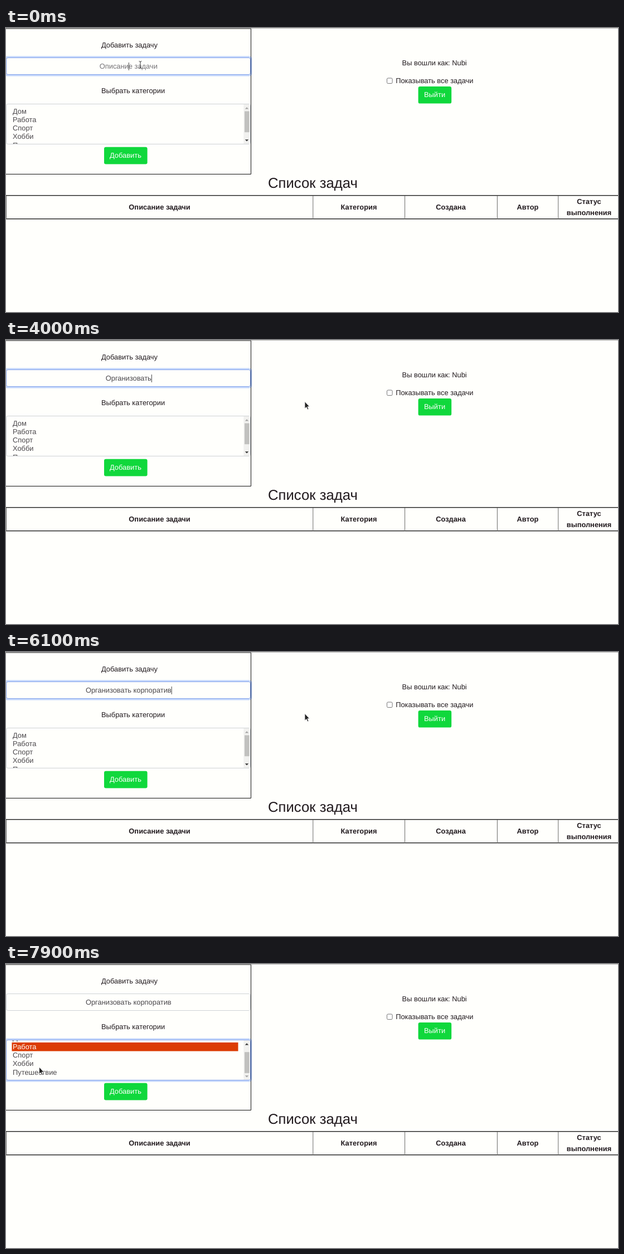
Write an HTML page that moves like this. It is 1098x510 px and loops after 8 s.

```html
<!DOCTYPE html>
<html lang="ru">
<head>
<meta charset="utf-8">
<title>Список задач</title>
<style>
  html, body { margin: 0; width: 100%; height: 100%; overflow: hidden; background: #fffffc; }
  svg { display: block; width: 1098px; height: 510px; }
  text {
    font: 12.86px "Liberation Sans", Arial, sans-serif;
    fill: #211a1e; white-space: pre; text-rendering: geometricPrecision;
  }
  .title { font-size: 25.72px; }
  .head text { font-weight: bold; text-anchor: middle; }
  .btn rect { fill: #10d83c; }
  .btn text { fill: #fff; }
  .field { fill: #fffffc; stroke: #ced2d6; }
  .focus rect { fill: none; stroke: #86a4ea; }
  .focus .ring { stroke: rgb(13, 90, 245); stroke-opacity: .25; stroke-width: 2.6; }
  .options text { fill: #4b484c; }
  .options .chosen { fill: #fff; }
  #hint { fill: #747276; }
  #typed { fill: #4b484c; }
  #hint, #typed { text-anchor: middle; }
</style>
</head>
<body>
<svg viewBox="0 0 1098 510">
  <defs>
    <clipPath id="listClip"><rect x="1" y="137" width="425" height="71"/></clipPath>
  </defs>

  <path d="M440 .5H1098" stroke="#b8b8b6"/>
  <path d="M0 1H439.5V262.5H0" fill="none" stroke="#111"/>

  <text x="171" y="35">Добавить задачу</text>
  <text x="171" y="117">Выбрать категории</text>

  <rect class="field" x=".5" y="53.5" width="438" height="30" rx="3"/>
  <g class="focus" id="inputFocus">
    <rect class="ring" x="-1.3" y="51.7" width="441.6" height="33.6" rx="4.3"/>
    <rect x=".5" y="53.5" width="438" height="30" rx="3"/>
  </g>
  <text id="hint" x="219.8" y="73">Описание задачи</text>
  <text id="typed" x="219.8" y="73"></text>
  <rect id="caret" y="62" width="1" height="14" fill="#444"/>

  <rect class="field" x=".5" y="136.5" width="438" height="72" rx="3"/>
  <g clip-path="url(#listClip)">
    <g class="options" id="options">
      <rect id="mark" x="10.5" y="157" width="406" height="15.6" fill="#dc3c04"/>
    </g>
  </g>
  <rect x="426.3" y="137" width="11.7" height="71" fill="#f1f1ef"/>
  <rect id="thumb" x="428" y="149.5" width="8.6" height="37.7" fill="#c1c1bf"/>
  <path id="up" d="M428.8 145.6H435.2L432 142.2Z"/>
  <path id="down" d="M428.8 200.2H435.2L432 203.6Z"/>
  <g class="focus" id="listFocus">
    <rect class="ring" x="-1.3" y="134.7" width="441.6" height="75.6" rx="4.3"/>
    <rect x=".5" y="136.5" width="438" height="72" rx="3"/>
  </g>

  <g class="btn">
    <rect x="176" y="213.8" width="77.6" height="30.6" rx="3.2"/>
    <text x="186" y="233.4">Добавить</text>
    <rect x="739.6" y="105" width="59.6" height="30.6" rx="3.2"/>
    <text x="750" y="124.4">Выйти</text>
  </g>

  <text x="710.6" y="67">Вы вошли как: Nubi</text>
  <rect x="683.5" y="90" width="9.6" height="9.6" rx="2" fill="#fff" stroke="#767676"/>
  <text x="699.2" y="99.4">Показывать все задачи</text>

  <text class="title" x="470" y="287">Список задач</text>
  <path d="M0 300.8H1098M0 342.8H1098" stroke="#2c2c2c" stroke-width="1.5"/>
  <path d="M.5 301V343M550.8 301V343M715.6 301V343M881.4 301V343M990.8 301V343" stroke="#6a6a68"/>
  <g class="head">
    <text x="275.5" y="326">Описание задачи</text>
    <text x="633" y="326">Категория</text>
    <text x="798" y="326">Создана</text>
    <text x="936" y="326">Автор</text>
    <text x="1046" y="316.4">Статус</text>
    <text x="1046" y="335.7">выполнения</text>
  </g>

  <path id="beam" d="M238.6 59.6Q241 59.6 241 61.5V70.5Q241 72.4 238.6 72.4M243.4 59.6Q241 59.6 241 61.5M241 70.5Q241 72.4 243.4 72.4" fill="none" stroke="#3c3c3c"/>
  <path id="arrow" d="M0 0V12.7L2.9 10 5.1 14.6 7 13.7 4.9 9.2H8.6Z" fill="#242424" stroke="#fff" stroke-width=".8" stroke-linejoin="round"/>
</svg>

<script>
const LOOP = 8000, STEP = 100, CENTER = 219.8, SCROLL = 16.1;
const $ = id => document.getElementById(id);
const show = (el, on) => el.setAttribute("visibility", on ? "visible" : "hidden");
const progress = (t, from, to) => Math.min(1, Math.max(0, (t - from) / (to - from)));
const smooth = p => p * p * (3 - 2 * p);

// Moments of each key press; "<" is a backspace.
const keys = "Организоыв<<вать корпоратив";
const times = [800, 1100, 1400, 1700, 1800, 1800, 2200, 2500, 2600, 2800, 3200, 3400, 3500,
  3800, 3900, 4000, 4300, 4400, 4500, 4900, 5100, 5200, 5600, 5700, 5900, 6000, 6100];
times[7] = 2600;

const options = ["Дом", "Работа", "Спорт", "Хобби", "Путешествие"].map((name, i) => {
  const el = document.createElementNS("http://www.w3.org/2000/svg", "text");
  el.textContent = name;
  el.setAttribute("x", 12);
  el.setAttribute("y", 153.5 + i * 15.32);
  $("options").append(el);
  return el;
});

function textAt(t) {
  let text = "";
  times.forEach((at, i) => {
    if (at <= t) text = keys[i] === "<" ? text.slice(0, -1) : text + keys[i];
  });
  return text;
}

// Pointer stops: time, x, y.
const stops = [[100, 430, 99], [200, 536, 110.5], [6400, 536, 110.5],
  [7100, 54, 165.5], [7400, 54, 165.5], [7900, 59.5, 185]];

function pointerAt(t) {
  const i = Math.max(1, stops.findIndex(s => s[0] >= t));
  const [a, b] = [stops[i - 1], stops[i]];
  const p = smooth(progress(t, a[0], b[0]));
  return [a[1] + (b[1] - a[1]) * p, a[2] + (b[2] - a[2]) * p];
}

function caretOn(t) {
  if (t >= 7200) return false;
  const last = times.filter(at => at <= t).pop() ?? 100;
  return (t - last) % 1000 < 500;
}

function draw(t) {
  const text = textAt(t);
  $("typed").textContent = text;
  show($("hint"), !text);
  $("caret").setAttribute("x", CENTER + (text ? $("typed").getComputedTextLength() / 2 : 0));
  show($("caret"), t < 100 || caretOn(t));

  const picked = t >= 7200;
  show($("mark"), picked);
  options[1].classList.toggle("chosen", picked);

  const focus = t >= 7400 ? 1 : t >= 7300 ? .8 : 0;
  $("inputFocus").setAttribute("opacity", 1 - focus);
  $("listFocus").setAttribute("opacity", focus);

  const scroll = smooth(progress(t, 7500, 7800));
  $("options").setAttribute("transform", `translate(0 ${-SCROLL * scroll})`);
  $("thumb").setAttribute("y", 149.5 + 8.7 * scroll);
  $("up").setAttribute("fill", scroll > 0 ? "#333" : "#a3a3a3");
  $("down").setAttribute("fill", scroll < 1 ? "#333" : "#a3a3a3");

  show($("beam"), t < 100);
  show($("arrow"), t >= 100);
  $("arrow").setAttribute("transform", `translate(${pointerAt(t)})`);
}

let start, shown;
function tick(now) {
  start ??= now;
  const t = Math.floor((now - start) % LOOP / STEP) * STEP;
  if (t !== shown) draw(shown = t);
  requestAnimationFrame(tick);
}
draw(0);
requestAnimationFrame(tick);
</script>
</body>
</html>
```
